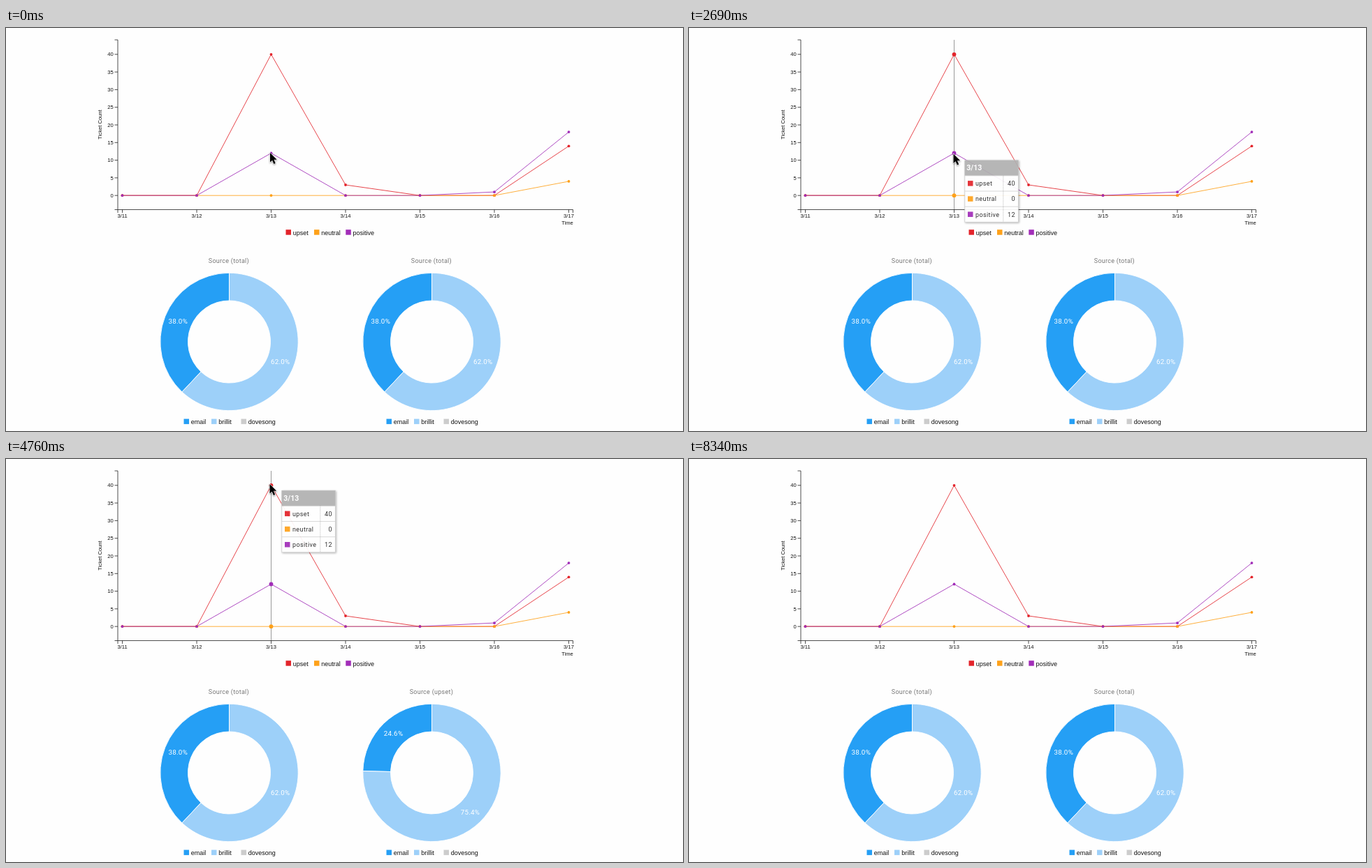
Animation, 969 px wide and 578 px high, one loop 8590 ms. Source, as an HTML page:

```html
<!DOCTYPE html>
<html lang="en">
<head>
<meta charset="utf-8">
<title>Ticket sentiment</title>
<style>
html, body { margin: 0; width: 100%; height: 100%; overflow: hidden; background: #fefefe; }
svg { display: block; }
text { font: 9px "Liberation Sans", Arial, sans-serif; fill: #111; }
.axis text { font-size: 7.6px; }
.axis path { fill: none; stroke: #222; stroke-width: .8; }
.title { font-family: Roboto, sans-serif; letter-spacing: .27px; fill: #777; }
.share { font: 9.75px Roboto, sans-serif; letter-spacing: .3px; fill: #fff; }
.tip text { font-family: Roboto, sans-serif; letter-spacing: .4px; fill: #222; }
.tip .head { font-size: 10.5px; font-weight: 700; letter-spacing: 0; fill: #fff; }
.tip { filter: drop-shadow(1.5px 1.5px 1.5px #0005); }
.mid { text-anchor: middle; }
.end { text-anchor: end; }
</style>
</head>
<body>
<svg width="969" height="578" viewBox="0 0 969 578">
  <g id="focus"></g>
  <g id="chart"></g>
  <g id="dots"></g>
  <g id="left"></g>
  <g id="right"></g>
  <g id="tip"></g>
  <path id="cursor" d="M0 0V13.6L3.1 10.7 5.4 16 7.7 15 5.5 9.8H9.7Z"
    stroke="#fff" stroke-width="1.1" paint-order="stroke" style="filter:drop-shadow(0 1px 1px #0006)"/>
</svg>
<script>
const LOOP = 8590, TICK = 148.4;   // the picture is refreshed once per tick
const series = [
  { name: "upset", color: "#e3242b", data: [0, 0, 40, 3, 0, 0, 14], legendX: 400.5 },
  { name: "neutral", color: "#fea11a", data: [0, 0, 0, 0, 0, 0, 4], legendX: 441 },
  { name: "positive", color: "#a12db8", data: [0, 0, 12, 0, 0, 1, 18], legendX: 486.3 }
];
const sources = [
  { name: "email", color: "#259ff5", legendX: -65 },
  { name: "brillit", color: "#9dd0f9", legendX: -25.5 },
  { name: "dovesong", color: "#ccc", legendX: 17 }
];
// Share of email in each view
const emailShare = { total: .38, positive: .548, upset: .246 };

// All times below are in ticks
const views = [
  { at: 0, view: "total", length: 0 },
  { at: 9, view: "positive", length: 2 },
  { at: 16, view: "total", length: 2 },
  { at: 29, view: "upset", length: 3 },
  { at: 40, view: "total", length: 2 }
];
const hovers = [
  { at: 0 },
  { at: 6, day: 2, dy: 9.3 },
  { at: 48, day: 5, dy: -18.5 },
  { at: 49 }
];
const stops = [
  { at: 0, x: 378, y: 179 },
  { at: 18, x: 378.5, y: 180.5 },
  { at: 23, x: 374.5, y: 31 },
  { at: 26, x: 377.5, y: 36 },
  { at: 47, x: 377.5, y: 36 },
  { at: 48, x: 727, y: 180 },
  { at: 56, x: 914, y: 590 }
];

const $ = id => document.getElementById(id);
const clamp = v => Math.min(1, Math.max(0, v));
const ease = u => u < .5 ? 4 * u ** 3 : 1 - 4 * (1 - u) ** 3;
const mix = (a, b, p) => a + (b - a) * p;
const lastIndex = (list, n) => list.findLastIndex(item => item.at <= n);

const px = i => 166.5 + 106.5 * i;
const py = v => 240.2 - 5.06 * v;
const day = i => "3/" + (11 + i);
const text = (x, y, s, cls = "", extra = "") => `<text x="${x}" y="${y}" class="${cls}" ${extra}>${s}</text>`;
const square = (x, y, color) => `<rect x="${x}" y="${y}" width="7.5" height="7.5" fill="${color}"/>`;
const legend = (x, y, { name, color }) => square(x, y, color) + text(x + 10.2, y + 7.3, name);

function drawChart() {
  let path = "M155.5 17H160V260.5H155.5M160 265V260.5H811.5V265";
  let labels = text(0, 0, "Ticket Count", "mid", 'transform="translate(137 138.5) rotate(-90)"')
    + text(811.8, 282.4, "Time", "end");
  for (let v = 0; v <= 40; v += 5) {
    path += `M155.5 ${py(v)}H160`;
    labels += text(153.7, py(v) + 2.6, v, "end");
  }
  for (let i = 0; i < 7; i++) {
    path += `M${px(i)} 260.5V265`;
    labels += text(px(i), 271.6, day(i), "mid");
  }
  const lines = series.map(s =>
    `<polyline points="${s.data.map((v, i) => [px(i), py(v)])}" fill="none" stroke="${s.color}" stroke-width=".85"/>`);
  $("chart").innerHTML = `<g class="axis"><path d="${path}"/>${labels}</g>` + lines.join("")
    + series.map(s => legend(s.legendX, 289.2, s)).join("");
}

function drawHover(hover, y) {
  const on = hover.day !== undefined;
  $("dots").innerHTML = series.map(s => s.data.map((v, i) =>
    `<circle cx="${px(i)}" cy="${py(v)}" r="${i === hover.day ? 2.9 : 1.9}" fill="${s.color}"/>`).join("")).join("");
  $("focus").innerHTML = on ? `<path d="M${px(hover.day)} 17V260.5" stroke="#888" stroke-width=".85"/>` : "";
  $("tip").innerHTML = on ? tooltip(hover.day, y + hover.dy) : "";
}

function tooltip(i, y) {
  const digits = Math.max(...series.map(s => String(s.data[i]).length));
  const w = 65.5 + 5.5 * digits, split = w - 10.5 - 5.5 * digits;
  const rows = series.map((s, k) => {
    const top = 22 + 22.2 * k;
    return `<path d="M0 ${top}H${w}" stroke="#ccc" stroke-width=".8"/>` + square(4.2, top + 7.3, s.color)
      + text(15.2, top + 14.4, s.name) + text(w - 4.3, top + 14.4, s.data[i], "end");
  });
  return `<g class="tip" opacity=".92" transform="translate(${px(i) + 15.3} ${y})">
    <rect width="${w}" height="88.5" fill="#fff" stroke="#ccc" stroke-width=".8"/>
    <rect width="${w}" height="22" fill="#b0b0b0"/>${text(2.5, 14.3, day(i), "head")}${rows.join("")}
    <path d="M${split} 22V88.5" stroke="#999" stroke-width=".8" stroke-dasharray=".8 1"/></g>`;
}

// The larger share comes first, clockwise from the top
function spans(view) {
  const e = emailShare[view];
  return e > .5 ? [[0, e], [e, 1]] : [[1 - e, 1], [0, 1 - e]];
}

function donut(cx, from, to, p) {
  const point = (r, f) => [cx + r * Math.sin(f * 2 * Math.PI), 450 - r * Math.cos(f * 2 * Math.PI)];
  const start = spans(from);
  let arcs = "", labels = "";
  spans(to).forEach((goal, k) => {
    const [a, b] = goal.map((f, j) => mix(start[k][j], f, p));
    const big = b - a > .5 ? 1 : 0;
    arcs += `<path d="M${point(98.7, a)}A98.7 98.7 0 ${big} 1 ${point(98.7, b)}L${point(59, b)}A59 59 0 ${big} 0 ${point(59, a)}Z"
      fill="${sources[k].color}" stroke="#fff" stroke-width=".9"/>`;
    const [x, y] = point(78.75, (goal[0] + goal[1]) / 2);
    labels += text(x, y + 3.4, ((goal[1] - goal[0]) * 100).toFixed(1) + "%", "share mid", `opacity="${p}"`);
  });
  return arcs + labels + text(cx - .6, 337.4, `Source (${to})`, "title mid")
    + sources.map(s => legend(cx + s.legendX, 560.6, s)).join("");
}

function cursorAt(n) {
  const i = lastIndex(stops, n), a = stops[i], b = stops[i + 1] || a;
  const p = b === a ? 0 : (n - a.at) / (b.at - a.at);
  return { x: mix(a.x, b.x, p), y: mix(a.y, b.y, p) };
}

function draw(n) {
  const v = lastIndex(views, n), { at, view, length } = views[v];
  const p = length ? ease(clamp((n - at + .3) / length)) : 1;
  $("right").innerHTML = donut(609.5, views[Math.max(0, v - 1)].view, view, p);
  const { x, y } = cursorAt(n);
  drawHover(hovers[lastIndex(hovers, n)], y);
  $("cursor").setAttribute("transform", `translate(${x} ${y})`);
}

let shown;
function frame() {
  const n = Math.floor(performance.now() % LOOP / TICK);
  if (n !== shown) draw(shown = n);
  requestAnimationFrame(frame);
}

drawChart();
$("left").innerHTML = donut(319.5, "total", "total", 1);
frame();
</script>
</body>
</html>
```
